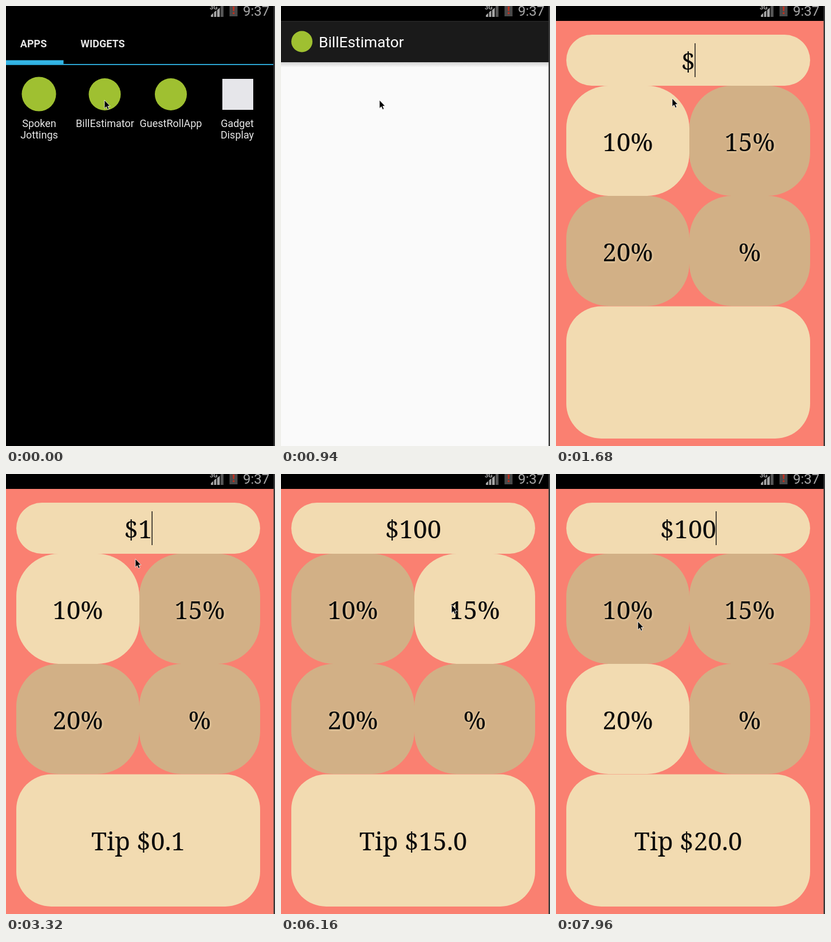
These frames come from a looping animation (470x767 px, 8 s). An HTML page:

```html
<!DOCTYPE html>
<html lang="en">
<head>
<meta charset="utf-8">
<title>Tip app</title>
<style>
  html, body { margin: 0; width: 100%; height: 100%; overflow: hidden; background: #000; }
  svg { display: block; width: 470px; height: 767px; }
  text { font-family: Roboto, sans-serif; }
  .mid { text-anchor: middle; }
  .tab { font-size: 18px; font-weight: 700; fill: #e6e6e6; }
  .label { font-size: 18px; fill: #e8e8e8; }
  .big { font: 43.9px "Noto Serif", serif; fill: #0a0a0a; text-anchor: middle; filter: drop-shadow(1.5px 1.5px 2px #f2dbb1); }
  .cream { fill: #f2dbb1; }
  .logo { fill: #9fc031; }
</style>
</head>
<body>
<svg viewBox="0 0 470 767">
  <defs>
    <linearGradient id="shade" x2="0" y2="1">
      <stop stop-opacity=".16"/><stop offset="1" stop-opacity="0"/>
    </linearGradient>
  </defs>
  <rect width="470" height="767"/>

  <g id="launcher">
    <text class="tab mid" x="48" y="72">APPS</text>
    <text class="tab mid" x="169" y="72">WIDGETS</text>
    <rect y="94.500" width="100.500" height="8.500" fill="#33b5e5"/>
    <rect y="101" width="467" height="2" fill="#2ca3d0"/>
    <circle class="logo" cx="57.500" cy="153.500" r="30"/>
    <text class="label mid" x="58" y="211">Spoken<tspan x="58" dy="20">Jottings</tspan></text>
    <g id="pressed">
      <circle class="logo" cx="172.500" cy="154" r="28"/>
      <text class="label mid" x="173" y="211">BillEstimator</text>
    </g>
    <circle class="logo" cx="288" cy="154" r="28"/>
    <text class="label mid" x="288" y="211">GuestRollApp</text>
    <rect x="378" y="127" width="54" height="54" fill="#e6e6ea"/>
    <text class="label mid" x="404" y="211">Gadget<tspan x="404" dy="20">Display</tspan></text>
  </g>

  <g id="app">
    <rect y="26" width="468" height="741" fill="#fa8071"/>
    <rect class="cream" x="18" y="50" width="426" height="89" rx="44.500"/>
    <text class="big" id="amount" x="231" y="112"></text>
    <rect id="caret" y="65" width="1.400" height="59" fill="#111"/>
    <g id="buttons"></g>
    <rect class="cream" x="18" y="523.500" width="426" height="230.500" rx="61"/>
    <text class="big" id="tip" x="231" y="656"></text>
  </g>

  <g id="splash">
    <rect y="26" width="468" height="741" fill="#fafafa"/>
    <rect y="98" width="468" height="9" fill="url(#shade)"/>
    <rect y="26" width="468" height="72" fill="#1a1a1a"/>
    <rect y="26" width="468" height="1.500" fill="#262626"/>
    <circle class="logo" cx="36.500" cy="62" r="18.500"/>
    <text x="66" y="72" font-size="26.300" fill="#fff">BillEstimator</text>
  </g>

  <g id="status">
    <rect width="468" height="26"/>
    <g fill="#a6a6a6">
      <text x="356" y="6" font-size="11" font-weight="700">3G</text>
      <path d="M358 19v-3l4-3.500v6.500zM363.500 19v-8l4-3.500V19zM369 19V7l4.500-4v16z"/>
      <path d="M375 19V0h5v19z" fill="#555"/>
      <text x="414" y="17" font-size="24">9:37</text>
    </g>
    <rect x="390.500" y="-3" width="14" height="21" fill="#4a4a4a"/>
    <path d="M396 1h3.500l-.7 8h-2.100zM396.200 11h3v3h-3z" fill="#c22e1c"/>
  </g>
  <rect x="467.500" width="2.500" height="767" fill="#3a3a3a"/>

  <path id="pointer" d="M0 0V14.500L3.300 11.500L5.600 16.500L8 15.400L5.800 10.600H10Z" stroke="#fff" stroke-width=".8"/>
</svg>
<script>
const LOOP = 8000, BEAT = 149.2, LEAD = 31;   // the screen refreshes once per beat
const BLINK = 3.5;                            // beats between caret toggles
const ENTRY = '$100';
const keys = [11.4, 21.8, 26.8, 29.5];        // beats: focus, then each digit
const taps = [41, 49];                        // beats: 15%, then 20%

const $ = id => document.getElementById(id);
const set = (el, attrs) => { for (const k in attrs) el.setAttribute(k, attrs[k]); };
const clamp = v => Math.min(1, Math.max(0, v));
const mix = (a, b, p) => a + (b - a) * p;
const smooth = p => p * p * (3 - 2 * p);
const countPast = (list, beat) => list.filter(b => b <= beat).length;

const make = (parent, tag, attrs, text = '') => {
  const el = document.createElementNS('http://www.w3.org/2000/svg', tag);
  set(el, attrs);
  el.textContent = text;
  return parent.appendChild(el);
};

const buttons = ['10%', '15%', '20%', '%'].map((label, i) => {
  const right = i % 2, y = i < 2 ? 139 : 331;
  const shape = make($('buttons'), 'rect', {
    x: right ? 233 : 18, y, width: right ? 211 : 215, height: 192, rx: 74 });
  make($('buttons'), 'text', { class: 'big', x: right ? 338.5 : 125.5, y: y + 113.5 }, label);
  return shape;
});

const home = { x: 172, y: 164 };
const glides = [
  { from: 9, to: 11, x: 203, y: 161 },
  { from: 11, to: 13, x: 226, y: 148 },
  { from: 36, to: 40, x: 298, y: 228 },
  { from: 43, to: 48, x: 138, y: 405 },
  { from: 50, to: 53, x: 143, y: 257 }
];

function movePointer(beat) {
  const { x, y } = glides.reduce((pos, g) => {
    const p = smooth(clamp((beat - g.from) / (g.to - g.from)));
    return { x: mix(pos.x, g.x, p), y: mix(pos.y, g.y, p) };
  }, home);
  set($('pointer'), { transform: `translate(${x} ${y})` });
}

// The window grows out of the pressed tile, then fades to reveal the app.
function openWindow(beat) {
  const p = clamp((beat - 2) / 4) ** 1.06;
  const left = mix(113.5, 0, p), right = mix(227, 468, p);
  const top = mix(124, 26, p), bottom = mix(250, 767, p);
  set($('splash'), {
    transform: `translate(${left} ${top}) scale(${(right - left) / 468} ${(bottom - top) / 741}) translate(0 -26)`,
    opacity: clamp(Math.min(p * 1.63, (11 - beat) * .375))
  });
  set($('pressed'), { opacity: beat < 3 ? 1 : .4 });
  set($('app'), { visibility: beat < 9 ? 'hidden' : 'visible' });
}

function fillForm(beat) {
  const pressed = Math.max(1, countPast(keys, beat));
  const chosen = countPast(taps, beat);
  const idle = Math.max(0, beat - keys[pressed - 1]);
  const amount = ENTRY.slice(0, pressed);
  const tip = amount.slice(1) * (10 + 5 * chosen) / 100;

  $('amount').textContent = amount;
  $('tip').textContent = tip ? `Tip $${tip.toFixed(1)}` : '';
  set($('caret'), {
    x: 230 + pressed * 12.27,
    opacity: 1 - Math.floor(idle / BLINK) % 2
  });
  buttons.forEach((b, i) => set(b, { fill: i === chosen ? '#f2dbb1' : '#d2b086' }));
}

const start = performance.now();
function frame() {
  const t = (performance.now() - start) % LOOP;
  const beat = Math.floor((t - LEAD) / BEAT);
  movePointer(beat);
  openWindow(beat);
  fillForm(beat);
  requestAnimationFrame(frame);
}
frame();
</script>
</body>
</html>
```
